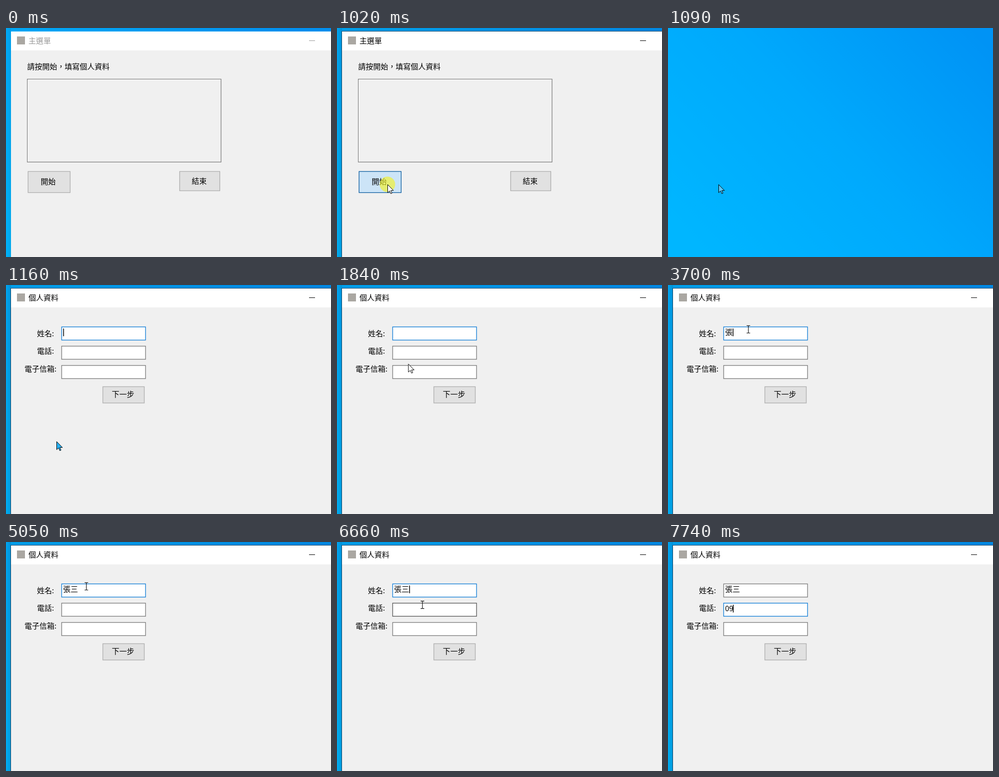
An HTML page for the animation above (8000 ms loop, 651x460 px).

```html
<!DOCTYPE html>
<html lang="zh-TW">
<head>
<meta charset="utf-8">
<title>表單操作</title>
<style>
  html, body { margin: 0; width: 100%; height: 100%; overflow: hidden; }
  svg { display: block; width: 651px; height: 460px; }
  text {
    font: 15px "Noto Sans CJK TC", "Noto Sans CJK", "Noto Sans", sans-serif;
    dominant-baseline: alphabetic;
  }
</style>
</head>
<body>
<svg id="stage" viewBox="0 0 651 460" xmlns="http://www.w3.org/2000/svg">
  <defs>
    <linearGradient id="sky" gradientUnits="userSpaceOnUse" x1="90" y1="480" x2="610" y2="0">
      <stop offset="0" stop-color="#00b6ff"/>
      <stop offset=".5" stop-color="#00a9fc"/>
      <stop offset="1" stop-color="#0093f5"/>
    </linearGradient>
    <linearGradient id="shade">
      <stop offset="0" stop-color="#003050" stop-opacity=".06"/>
      <stop offset="1" stop-color="#003050" stop-opacity=".22"/>
    </linearGradient>
  </defs>
  <rect width="651" height="460" fill="url(#sky)"/>
  <g id="win">
    <rect id="sideShade" width="10" height="460" fill="url(#shade)"/>
    <rect id="topShade" x="10" width="641" height="7" fill="#003050" opacity=".12"/>
    <path id="edge" d="M9.5 460V6.5H651" fill="none" stroke="#0b4368"/>
    <rect x="10" y="7" width="641" height="38" fill="#fff"/>
    <rect x="10" y="45" width="641" height="415" fill="#f0f0f0"/>
    <rect x="22" y="17" width="16" height="16" fill="#aaa7a2"/>
    <text id="caption" x="45" y="30.5"></text>
    <path id="minimise" d="M607 25.5H619"/>
    <g id="menu">
      <rect x="42.7" y="102.7" width="388" height="166.6" fill="none" stroke="#808080" stroke-width="1.3"/>
      <path d="M44.2 268.5V104.2H430" fill="none" stroke="#fff"/>
    </g>
    <g id="form"></g>
  </g>
  <circle id="halo" r="15.5" fill="#f2f22c" opacity=".66"/>
  <path id="arrow" d="M.5.5V16.8L4.3 13.3L6.8 18.8L9.2 17.8L6.8 12.4H12Z" stroke="#000" stroke-width="1"/>
  <path id="beam" d="M-3.5-7.5H-1L0-6.8L1-7.5H3.5M0-7V7M-3.5 7.5H-1L0 6.8L1 7.5H3.5" fill="none" stroke="#000" stroke-width="1.1"/>
</svg>
<script>
const LOOP = 8000, STEP = 70;
const $ = id => document.getElementById(id);

function add(parent, tag, attrs, content = '') {
  const el = document.createElementNS('http://www.w3.org/2000/svg', tag);
  set(el, attrs);
  el.textContent = content;
  parent.append(el);
  return el;
}
function set(el, attrs) {
  for (const name in attrs) el.setAttribute(name, attrs[name]);
}
const show = (el, on) => set(el, { visibility: on ? 'inherit' : 'hidden' });
const label = (parent, x, y, words) => add(parent, 'text', { x, y }, words);

function button(parent, x, y, width, height, textX, textY, words) {
  const box = add(parent, 'rect',
    { x, y, width, height, fill: '#e1e1e1', stroke: '#adadad', 'stroke-width': 1.3 });
  label(parent, textX, textY, words);
  return box;
}

label($('menu'), 42.5, 82.5, '請按開始，填寫個人資料');
const startButton = button($('menu'), 44.2, 288.2, 84.3, 42.4, 69.5, 314, '開始');
button($('menu'), 347.8, 288.2, 80.5, 38.7, 372, 313, '結束');

const form = $('form');
label(form, 62, 102.5, '姓名:');
label(form, 62, 137.5, '電話:');
label(form, 37, 174, '電子信箱:');
const fields = [84.2, 122.8, 161.6].map(y => ({
  y,
  box: add(form, 'rect', { x: 111.5, y, width: 168, height: 26.4, fill: '#fff', 'stroke-width': 1.4 }),
  text: label(form, 114.3, y + 15.8, '')
}));
button(form, 194, 204.3, 83, 32.7, 212, 225, '下一步');
const caret = add(form, 'rect', { width: 1.5, height: 15.5, fill: '#000' });

// Pointer moves: start, end, from x, from y, to x, to y
const moves = [
  [250, 880, 330, 452, 101, 314],
  [1490, 2100, 101, 314, 161, 89],
  [6110, 6810, 161, 89, 173, 133]
];
const clicks = [[950, 1090], [2170, 2240], [6870, 7010]];
// Caret changes: time, visible, field, x
const carets = [
  [1160, 1, 0, 115], [1690, 0, 0, 115], [2710, 1, 0, 115], [3240, 0, 0, 115],
  [3700, 1, 0, 130], [4230, 0, 0, 130], [4500, 1, 0, 145], [5050, 0, 0, 145],
  [5580, 1, 0, 145], [6110, 0, 0, 145], [6640, 1, 0, 145], [6940, 1, 1, 115],
  [7470, 0, 1, 115], [7670, 1, 1, 122.5], [7740, 1, 1, 130.3]
];
const typing = [
  [[0, ''], [3700, '張'], [4500, '張三']],
  [[0, ''], [7670, '0'], [7740, '09']],
  [[0, '']]
];

const latest = (table, t) => table.filter(row => row[0] <= t).pop() || table[0];
const ease = p => p * p * (3 - 2 * p);
const within = (t, [from, to]) => t >= from && t < to;

function pointer(t) {
  const [start, end, x0, y0, x1, y1] = latest(moves, t);
  const held = start + Math.floor((t - start) / STEP) * STEP + STEP / 2;
  const p = ease(Math.min(1, Math.max(0, (held - start) / (end - start))));
  return { x: x0 + (x1 - x0) * p, y: y0 + (y1 - y0) * p };
}
function over(box, { x, y }) {
  const [bx, by, w, h] = ['x', 'y', 'width', 'height'].map(k => +box.getAttribute(k));
  return x >= bx && x <= bx + w && y >= by && y <= by + h;
}
// Hover fades over the last 300 ms
function heat(box, t) {
  let sum = 0;
  for (let i = 0; i < 6; i++) sum += over(box, pointer(t - i * 50));
  return sum / 6;
}

function render(t) {
  const onMenu = t < 1090, onForm = t >= 1160, active = t >= 950;
  const at = pointer(t);
  const ink = active ? '#000' : '#999';

  show($('win'), onMenu || onForm);
  show($('menu'), onMenu);
  show(form, onForm);
  show($('edge'), active);
  set($('sideShade'), { opacity: active ? 1 : .5 });
  set($('topShade'), { opacity: active ? .12 : .05 });
  set($('caption'), { fill: ink });
  set($('minimise'), { stroke: ink });
  $('caption').textContent = onMenu ? '主選單' : '個人資料';

  const hovered = t >= 250 && over(startButton, at);
  set(startButton, active ? { fill: '#cce4f7', stroke: '#0a5ca0' }
    : hovered ? { fill: '#e5f1fb', stroke: '#0078d7' }
    : { fill: '#e1e1e1', stroke: '#adadad' });

  const [, lit, focus, caretX] = latest(carets, t);
  fields.forEach((field, i) => {
    const grey = Math.round(128 - 105 * heat(field.box, t));
    set(field.box, { stroke: i === focus ? '#1a82d8' : `rgb(${grey},${grey},${grey})` });
    field.text.textContent = latest(typing[i], t)[1];
  });
  set(caret, { x: caretX - .4, y: fields[focus].y + 3.2 });
  show(caret, onForm && lit);

  const place = `translate(${at.x} ${at.y})`;
  const editing = onForm && fields.some(field => over(field.box, at));
  for (const id of ['arrow', 'beam', 'halo']) set($(id), { transform: place });
  set($('arrow'), { fill: within(t, [1090, 1160]) ? '#5ac6f8' : within(t, [1160, 1490]) ? '#27b3f7' : '#fff' });
  show($('arrow'), t >= 250 && !editing);
  show($('beam'), editing && t < 7670);
  show($('halo'), clicks.some(span => within(t, span)));
}

function frame() {
  render(performance.now() % LOOP);
  requestAnimationFrame(frame);
}
frame();
</script>
</body>
</html>
```
